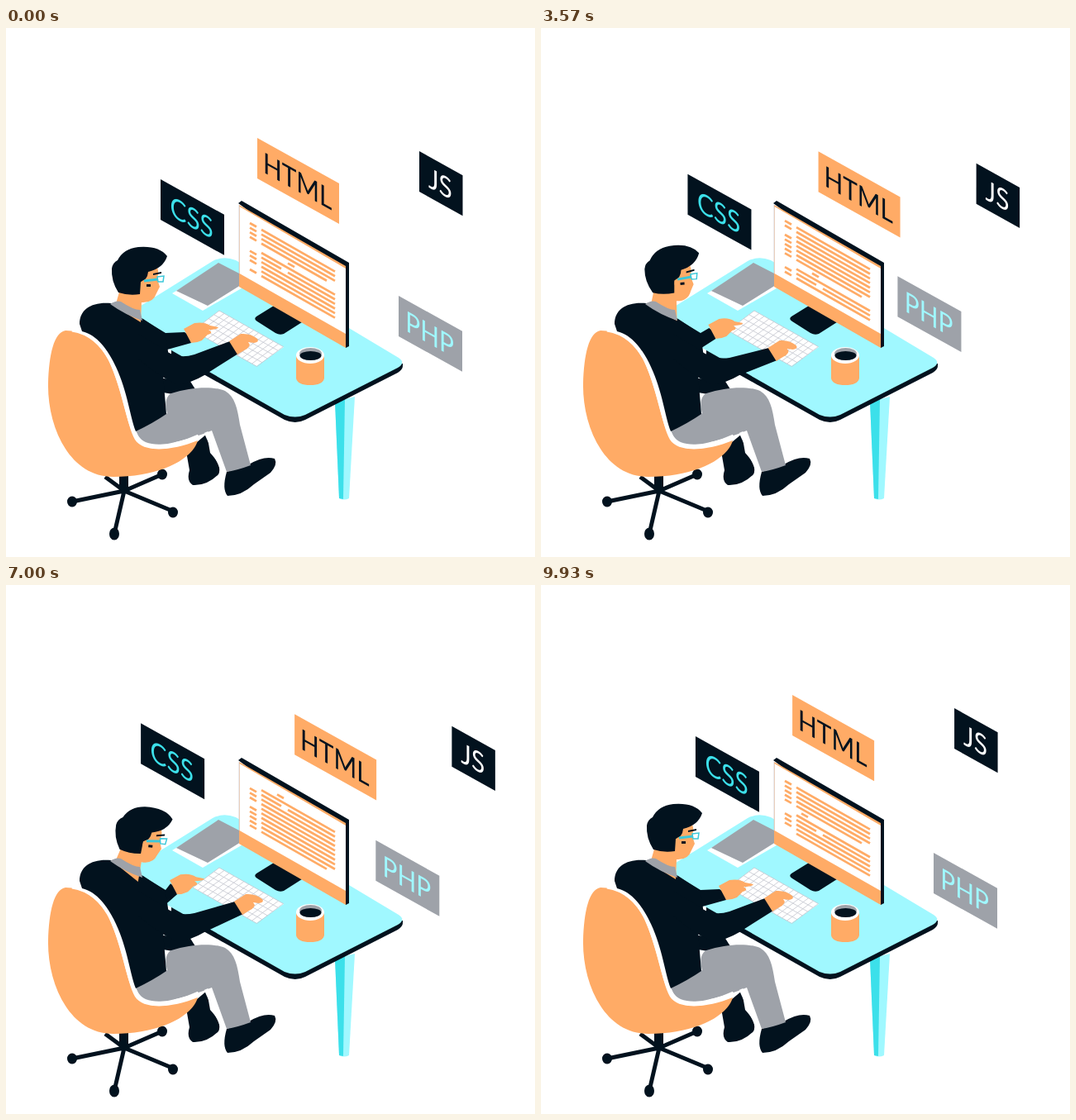
Write an HTML page that moves like this. It is 640x640 px and loops after 10 s.

```html
<!DOCTYPE html>
<html lang="en">
<head>
<meta charset="utf-8">
<title>Developer at a desk</title>
<style>
  html, body { margin: 0; width: 100%; height: 100%; overflow: hidden; background: #fff; }
  svg { display: block; width: 100%; height: 100%; }
  text { font: 34.5px Lato, "Open Sans", sans-serif; text-anchor: middle; }
  .navy { fill: #02121e; }
  .orange { fill: #ffab66; }
  .cyan { fill: #a0f8ff; }
  .teal { fill: #3ce0ea; }
  .grey { fill: #9ea2a9; }
  .white { fill: #fff; }
  .line { fill: none; }
</style>
</head>
<body>
<svg viewBox="0 0 640 640">
  <defs>
    <clipPath id="page"><path d="M284 224L410 296V362L284 291Z"/></clipPath>
  </defs>

  <!-- desk -->
  <path class="cyan" d="M398 452L422 446L415 569Q409 572 403 569Z"/>
  <path class="teal" d="M398 452L410 449L408 570L403 569Z"/>
  <path class="navy" d="M200 385L480 406V409Q480 413 474 417L362 474Q350 480 337 474L200 397Z"/>
  <path class="cyan" d="M160 338L250 282Q263 275 278 281L475 399Q484 405 474 411L362 468Q350 473 337 468L165 370Z"/>
  <path class="white" d="M201 321L257 288L290 304V312L238 342Z"/>
  <path class="grey" d="M206 318L257 284L290 301L284 311L244 336Z"/>

  <path class="white" d="M226 366L258 342L336 386L303 409Z"/>
  <path id="keys" class="line" stroke="#c3c6ce" stroke-width=".8"/>

  <!-- monitor -->
  <path class="navy" d="M303 349L324 336L358 356L336 370Q331 372 326 369L304 355Q299 352 303 349Z"/>
  <path class="navy" d="M281 212L285 209L415 284V385L411 387L400 300Z"/>
  <path class="orange" d="M282 214L411 288V387L282 313Z"/>
  <path class="white" d="M282.500 216L411 291V370L282.500 297Z"/>
  <path class="line" stroke="#c3c6ce" stroke-width=".7" d="M282 214V297"/>
  <path id="code" class="line" stroke="#ffab66" stroke-width="2.700" clip-path="url(#page)"/>

  <!-- mug -->
  <path class="orange" d="M351 397V424Q353 432 368 432Q383 432 385 424V397Z"/>
  <ellipse class="white" cx="368" cy="396" rx="17" ry="10"/>
  <ellipse class="grey" cx="368.500" cy="394" rx="13.500" ry="7"/>
  <ellipse class="navy" cx="368.500" cy="396.500" rx="13" ry="5.500"/>

  <!-- far arm -->
  <path id="farArm" class="navy"/>
  <path id="farHand" class="orange" d="M215 364L228 357Q240 355 247 360L257 362Q256 365 245 365Q252 369 244 371L237 378Q231 381 224 381Z"/>

  <!-- chair base -->
  <g class="navy" stroke="#02121e" stroke-width="5">
    <path d="M143 541V561M143 560L80 573M143 560L189 540M143 560L203 585M143 560L131 612M143 560L120 543"/>
    <path stroke-width="11" d="M142.500 541V562"/>
    <ellipse cx="80" cy="573" rx="3.500" ry="4"/>
    <ellipse cx="189" cy="540" rx="3.500" ry="4"/>
    <ellipse cx="202" cy="586" rx="3.500" ry="4"/>
    <ellipse cx="131" cy="612" rx="3.500" ry="5"/>
  </g>

  <!-- legs and chair -->
  <path class="navy" d="M218 512L243 491L247 514Q262 530 257 540Q243 554 226 553Q218 548 222 535Z"/>
  <path class="navy" d="M267 537L294 528Q312 517 325 521Q329 528 320 538L300 552Q285 566 268 566Q261 558 267 537Z"/>
  <path class="navy" d="M190 424L222 426L229 437L202 443L190 441Z"/>
  <path class="grey" d="M157 487L195 466C192 455 193 446 200 442C225 434 250 433 265 439C277 446 280 460 283 480L296 529Q280 535 267 537L249 487Q230 495 205 501C185 510 165 508 157 487Z"/>
  <path class="orange" d="M72 366C92 366 112 378 124 402C142 440 146 480 156 498C166 514 200 512 232 499C226 522 185 543 130 543C75 543 50 480 51 430C52 395 58 368 72 366Z"/>
  <path class="line" stroke="#fff" stroke-width="5" d="M80 365C100 368 116 380 128 404C144 440 147 476 158 495C168 511 200 509 233 494"/>
  <path class="line" stroke="#fff" stroke-width="5" d="M242 489L263 536"/>

  <!-- torso, near arm -->
  <path class="navy" d="M89 358C89 340 104 331 127 333L166 352L193 370L198 405L190 420L194 467Q178 478 157 488C150 470 147 440 133 410C124 390 110 371 92 367Z"/>
  <path id="nearArm" class="navy"/>
  <path id="nearHand" class="orange" d="M270 379L284 370Q296 369 304 376Q307 380 300 381L293 380Q298 385 288 390L280 395Z"/>

  <!-- head -->
  <g id="head">
    <path class="orange" d="M138 316L132 337L163 356L164 332Q178 333 182 321L186 313L183 304Q186 292 181 286L150 285Z"/>
    <path class="navy" d="M128 291Q129 284 135 281Q142 267 160 265Q185 263 195 276Q190 291 172 295Q171 305 163 307L162 322Q148 324 136 320Q127 306 128 291Z"/>
    <ellipse class="orange" cx="167" cy="311" rx="4" ry="6"/>
    <path class="navy" d="M178 297L188 295V297L178 299ZM170 310H175V313H170Z"/>
    <path class="line" stroke="#3cc8da" stroke-width="3" d="M167 306L184 304"/>
    <path class="white" stroke="#3cc8da" stroke-width="1.500" d="M183 301L191 300L190 307L184 307Z"/>
  </g>
  <path class="grey" d="M126 334Q133 329 139 331Q154 341 162 341L165 354Q144 347 126 334Z"/>

  <g id="signs"></g>
</svg>
<script>
const LOOP = 10000;
const $ = id => document.getElementById(id);

// Each sign: start, size, end of its travel, turning times in ms.
const signs = [
  { label: "HTML", box: "orange", ink: "navy", w: 99, from: [304, 133], to: [355.300, 159.500], turns: [0, 2450, 5080, 7560, LOOP] },
  { label: "CSS", box: "navy", ink: "teal", w: 77, from: [187, 183], to: [161, 166], turns: [0, 1550, 5000, 7450, LOOP] },
  { label: "JS", box: "navy", ink: "white", w: 52.500, from: [500, 149], to: [543.500, 173], turns: [0, 2500, 5000, 7500, LOOP] },
  { label: "PHP", box: "grey", ink: "cyan", w: 77, from: [475, 324], to: [426.500, 297.500], turns: [0, 4500, LOOP] }
];

const ISO_X = 0.866, ISO_Y = 0.482;
$("signs").innerHTML = signs.map(({ label, box, ink, w }) => `<g>
  <rect class="${box}" width="${w / ISO_X}" height="49"/>
  <text class="${ink}" x="${w / ISO_X / 2 - 1}" y="37.500">${label}</text></g>`).join("");
const signNodes = [...$("signs").children];

// Keyboard grid: 5 rows by 13 columns on a slanted quad.
const keyPoint = (u, v) => `${226 + 32 * u + 77.500 * v} ${366 - 24 * u + 43.500 * v}`;
let grid = "";
for (let i = 0; i <= 5; i++) grid += `M${keyPoint(i / 5, 0)}L${keyPoint(i / 5, 1)}`;
for (let i = 0; i <= 13; i++) grid += `M${keyPoint(0, i / 13)}L${keyPoint(1, i / 13)}`;
$("keys").setAttribute("d", grid);

const smooth = p => (1 - Math.cos(Math.PI * p)) / 2;
const linear = p => p;

function tween(t, keys, ease = smooth) {
  let i = 1;
  while (i < keys.length - 1 && t > keys[i][0]) i++;
  const [t0, a] = keys[i - 1], [t1, b] = keys[i];
  return a + (b - a) * ease((t - t0) / (t1 - t0));
}

const nod = [[0, 0], [1000, 7.500], [2130, 7.500], [2450, 1], [3210, 0], [3700, -4.500], [4750, -4.500],
  [5950, 7.500], [6900, 7.500], [7850, -4], [8700, -4], [9600, 0], [LOOP, 0]];
const scroll = [[0, 0], [1210, 4], [2430, 4.500], [4710, 10.500], [6210, 15], [7790, 15.500], [LOOP, 21]];
const farReach = [[0, 0], [1000, -17], [2700, -17], [4600, -7], [6000, -17], [8000, -17], [9700, 0], [LOOP, 0]];
const nearX = [[0, 0], [1300, 0], [4600, 6], [8000, 6], [9700, 0], [LOOP, 0]];
const nearY = [[0, 0], [1200, -2], [2400, 8], [4710, 8], [6000, 4], [8000, 4], [9700, 0], [LOOP, 0]];

// A gap row with one short piece follows every ten full rows.
function codeLines(offset) {
  const first = Math.floor(offset);
  let d = "";
  const dash = (x0, x1, y) => d += `M${x0} ${y + (x0 - 295) * 0.570}L${x1} ${y + (x1 - 295) * 0.570}`;
  for (let row = first; row < first + 13; row++) {
    const y = 236 + (row - offset) * 5.600;
    const kind = row % 11;
    if (y < 233 || y > 296) continue;
    if (kind === 4) {
      const x = 313 + (row * 7) % 30;
      dash(x, x + 8, y);
      continue;
    }
    if (kind !== 5 && kind !== 9) dash(295, 303, y);
    if (kind === 6) {
      dash(309, 333, y);
      dash(341, 398, y);
    } else {
      dash(309, kind === 3 ? 388 : 398, y);
    }
  }
  return d;
}

function draw(t) {
  signs.forEach(({ from, to, turns }, i) => {
    const p = tween(t, turns.map((time, k) => [time, k % 2]));
    const x = from[0] + (to[0] - from[0]) * p, y = from[1] + (to[1] - from[1]) * p;
    signNodes[i].setAttribute("transform", `matrix(${ISO_X} ${ISO_Y} 0 1 ${x} ${y})`);
  });

  $("head").setAttribute("transform", `rotate(${tween(t, nod)} 138 332)`);
  $("code").setAttribute("d", codeLines(tween(t, scroll, linear)));

  const fx = tween(t, farReach), fy = fx * 0.400;
  $("farHand").setAttribute("transform", `translate(${fx} ${fy})`);
  $("farArm").setAttribute("d",
    `M165 352L193 369L${216 + fx} ${368 + fy}Q${223 + fx} ${372 + fy} ${224 + fx} ${381 + fy}L188 391Z`);

  const nx = tween(t, nearX), ny = tween(t, nearY);
  $("nearHand").setAttribute("transform", `translate(${nx} ${ny})`);
  $("nearArm").setAttribute("d",
    `M160 370L190 388Q206 402 228 ${395 + ny / 2}L${271 + nx} ${379 + ny}Q${279 + nx} ${384 + ny} ${281 + nx} ${394 + ny}L240 420Q220 432 205 430Q185 422 160 400Z`);
}

function frame() {
  draw(performance.now() % LOOP);
  requestAnimationFrame(frame);
}
frame();
</script>
</body>
</html>
```
